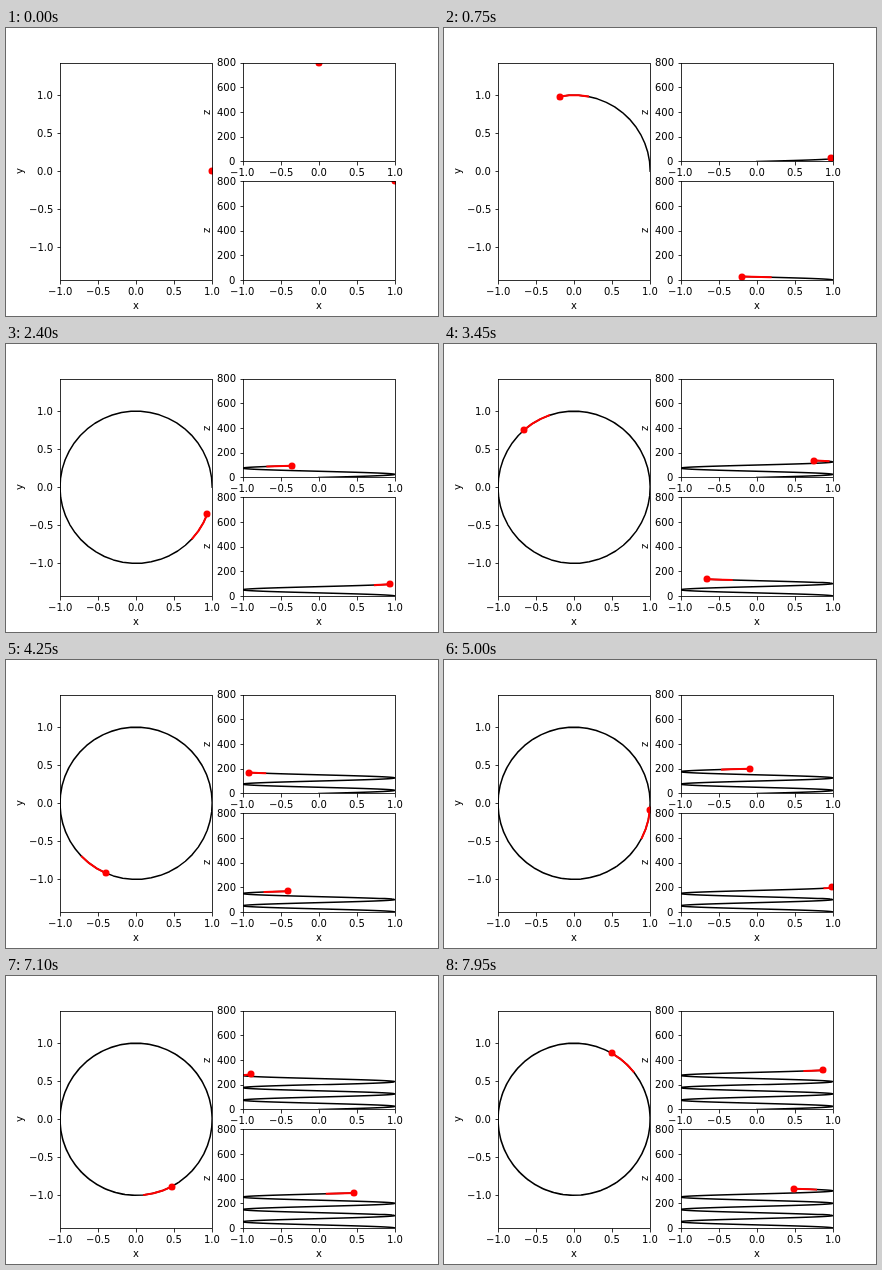
An HTML page with a canvas that plays this animation: 432 by 288 pixels, repeating every 8000 ms.

```html
<!DOCTYPE html>
<html lang="en">
<head>
<meta charset="utf-8">
<title>Helix projections</title>
<style>
html, body { margin: 0; width: 100%; height: 100%; overflow: hidden; background: #fff; }
canvas { display: block; width: 432px; height: 288px; }
</style>
</head>
<body>
<canvas id="stage" width="432" height="288"></canvas>
<script>
const ctx = document.getElementById('stage').getContext('2d');

const LOOP = 8000, STEP = 50, POINTS = 400, TAIL = 4;
const X_TICKS = [-1, -0.5, 0, 0.5, 1];
const Z_TICKS = [0, 200, 400, 600, 800];

// Helix sampled evenly over eight turns.
const helix = Array.from({ length: POINTS }, (_, i) => {
  const t = 80 * i / (POINTS - 1);
  const a = 2 * Math.PI * t / 10;
  return { x: Math.cos(a), y: Math.sin(a), z: 10 * t };
});

const decimal = v => v.toFixed(1).replace('-', '\u2212');

// Panel edges; lo and hi are the vertical data limits.
const HALF = 217.44 / 152.1818;
const zPanel = (h, top, bottom, xName) => ({
  left: 236.618, right: 388.8, top, bottom, lo: 0, hi: 800,
  h, v: 'z', ticks: Z_TICKS, format: String, xName, yName: 'z', yBase: 204
});
const panels = [
  {
    left: 54, right: 206.182, top: 34.56, bottom: 252, lo: -HALF, hi: HALF,
    h: 'x', v: 'y', ticks: X_TICKS, format: decimal, xName: 'x', yName: 'y', yBase: 17
  },
  zPanel('y', 34.56, 133.396, ''),
  zPanel('x', 153.164, 252, 'x')
];

const round = v => Math.floor(v + 0.5);
const crisp = v => round(v) + 0.5;
const mapX = (p, v) => p.left + (v + 1) / 2 * (p.right - p.left);
const mapY = (p, v) => p.bottom - (v - p.lo) / (p.hi - p.lo) * (p.bottom - p.top);

function clipped(p, extra, draw) {
  const l = round(p.left), t = round(p.top);
  ctx.save();
  ctx.beginPath();
  ctx.rect(l, t, round(p.right) - l + extra, round(p.bottom) - t + extra);
  ctx.clip();
  draw();
  ctx.restore();
}

function curve(p, from, to, color, width) {
  if (to - from < 2) return;
  ctx.beginPath();
  for (let i = from; i < to; i++) {
    ctx.lineTo(mapX(p, helix[i][p.h]), mapY(p, helix[i][p.v]));
  }
  ctx.strokeStyle = color;
  ctx.lineWidth = width;
  ctx.lineCap = 'square';
  ctx.lineJoin = 'round';
  ctx.stroke();
}

function dot(p, q) {
  ctx.beginPath();
  ctx.arc(round(mapX(p, q[p.h])), round(mapY(p, q[p.v])), 3.5, 0, 2 * Math.PI);
  ctx.fillStyle = '#f00';
  ctx.fill();
}

// align: 0.5 centres the text on x, 1 ends it there.
function label(text, x, y, align) {
  ctx.fillText(text, round(x - align * ctx.measureText(text).width), y);
}

function segment(x1, y1, x2, y2) {
  ctx.beginPath();
  ctx.moveTo(x1, y1);
  ctx.lineTo(x2, y2);
  ctx.stroke();
}

function axes(p) {
  const l = crisp(p.left), r = crisp(p.right), t = crisp(p.top), b = crisp(p.bottom);
  ctx.strokeStyle = ctx.fillStyle = '#000';
  ctx.lineWidth = 0.8;
  ctx.lineCap = 'butt';
  ctx.lineJoin = 'miter';
  ctx.font = '10px "DejaVu Sans", sans-serif';

  for (const v of X_TICKS) {
    const x = mapX(p, v);
    segment(crisp(x), b, crisp(x), b + 4);
    label(decimal(v), x, round(p.bottom + 15), 0.5);
  }
  for (const v of p.ticks) {
    const y = mapY(p, v);
    segment(l - 3, crisp(y), l, crisp(y));
    label(p.format(v), p.left - 7, round(y + 3.65), 1);
  }
  ctx.strokeRect(l, t, r - l, b - t);

  label(p.xName, (p.left + p.right) / 2, 281, 0.5);
  ctx.save();
  ctx.translate(p.yBase, round((p.top + p.bottom) / 2 + ctx.measureText(p.yName).width / 2));
  ctx.rotate(-Math.PI / 2);
  ctx.fillText(p.yName, 0, 0);
  ctx.restore();
}

function render(now) {
  const n = Math.floor(now % LOOP / STEP);
  const head = helix[(n - 1 + POINTS) % POINTS];
  ctx.fillStyle = '#fff';
  ctx.fillRect(0, 0, 432, 288);
  for (const p of panels) {
    clipped(p, 0, () => {
      curve(p, 0, n, '#000', 1.5);
      curve(p, Math.max(0, n - TAIL), n, '#f00', 2);
    });
    clipped(p, 1, () => dot(p, head));
    axes(p);
  }
}

const start = performance.now();
function tick() {
  render(performance.now() - start);
  requestAnimationFrame(tick);
}
tick();
</script>
</body>
</html>
```
